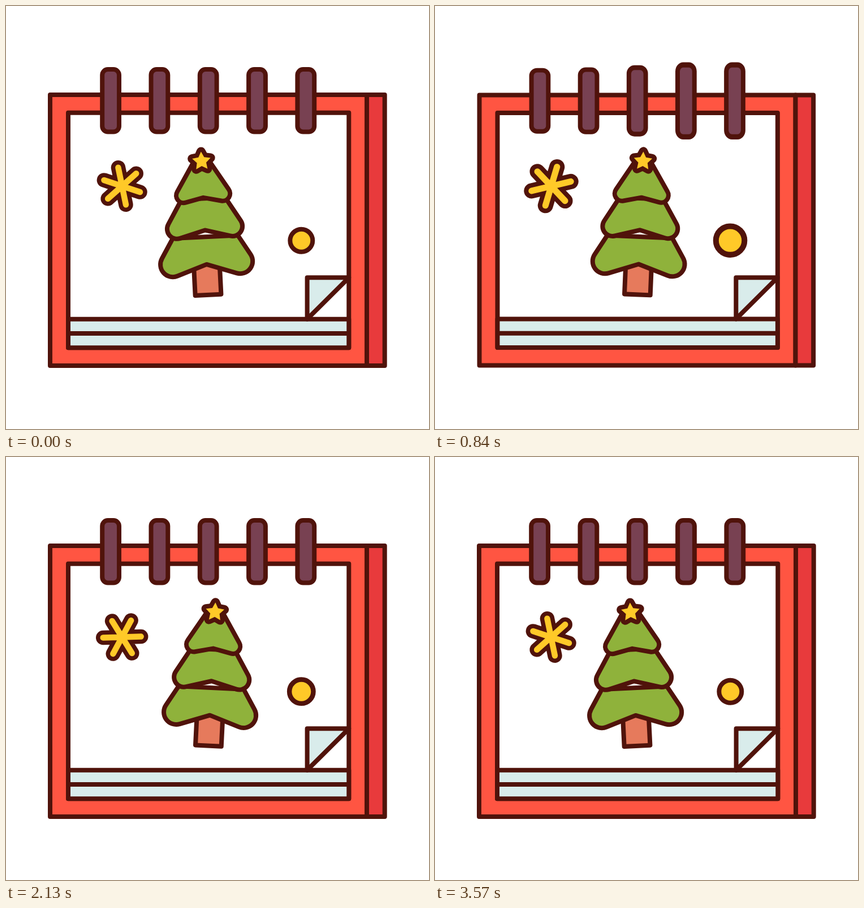
An HTML page for the animation above (3.6 s loop, 748 by 748 pixels).

```html
<!DOCTYPE html>
<html lang="en">
<head>
<meta charset="utf-8">
<title>Holiday calendar</title>
<style>
  html, body { margin: 0; width: 100%; height: 100%; overflow: hidden; background: #fff; }
  svg { display: block; width: 100vw; height: 100vh; }
  .ink { stroke: #50130b; stroke-width: 8; stroke-linejoin: round; stroke-linecap: round; }
</style>
</head>
<body>
<svg viewBox="0 0 748 748">
  <g id="calendar" class="ink" fill="none">
    <path fill="#ff5542" d="M78 157H638V636H78Z"/>
    <path fill="#e83a3c" d="M638 157H669.7V636H638Z"/>
    <path fill="#fff" d="M110 188.7H606.3V604.3H110Z"/>
    <path fill="#d9eceb" d="M110 553.7H606.3V604.3H110ZM110 579H606.3"/>
    <path fill="#d9eceb" d="M532.6 480.3H606.3L532.6 553.7Z"/>
    <g id="flake"></g>
    <circle id="dot" r="20" fill="#ffc928"/>
    <g id="tree">
      <path fill="#e67a5c" d="M334.8 455H380.6V510.7H334.8Z"/>
      <g id="tiers" fill="#8fb23b"></g>
      <path id="star" fill="#ffc928" stroke-width="16" paint-order="stroke"/>
    </g>
    <g id="rings" fill="#784152"></g>
  </g>
</svg>
<script>
const $ = id => document.getElementById(id);
const FRAME = 30, FRAMES = 120, RISE = 7, AXIS = 357.6;

// One half tier: top edge, round corner, centre notch; mirrored about the axis.
function tier(topX, topY, x1, y1, r, x2, y2, notch) {
  const m = x => 2 * AXIS - x;
  return `<path d="M${topX} ${topY}L${x1} ${y1}A${r} ${r} 0 0 0 ${x2} ${y2}L${AXIS} ${notch}` +
    `L${m(x2)} ${y2}A${r} ${r} 0 0 0 ${m(x1)} ${y1}L${m(topX)} ${topY}Z"/>`;
}

$('tiers').innerHTML =
  tier(300, 408, 279.3, 442.4, 22, 305.2, 474.8, 456.7) +
  tier(319, 340, 293.6, 382.3, 17.5, 313.2, 408.4, 396.2) +
  tier(341, 279, 312, 326, 13, 325.9, 345.7, 338.5);

const starPoints = Array.from({ length: 10 }, (_, i) => {
  const a = i * Math.PI / 5, r = i % 2 ? 8.6 : 17.1;
  return `${AXIS + r * Math.sin(a)} ${274.1 - r * Math.cos(a)}`;
});
$('star').setAttribute('d', `M${starPoints.join('L')}Z`);
$('star').style.strokeWidth = 16;

const arms = [0, 60, 120].map(a => {
  const x = 33.5 * Math.cos(a * Math.PI / 180), y = 33.5 * Math.sin(a * Math.PI / 180);
  return `M${-x} ${-y}L${x} ${y}`;
}).join('');
$('flake').innerHTML =
  `<path d="${arms}" style="stroke-width:25.5"/><path d="${arms}" style="stroke:#ffc928;stroke-width:10.5"/>`;

const rings = Array.from({ length: 5 }, () => {
  $('rings').insertAdjacentHTML('beforeend',
    '<rect x="-14.9" y="-55.2" width="29.8" height="110.4" rx="10"/>');
  return $('rings').lastElementChild;
});

// Linear rise to full size, then a damped spring around it.
function pop(f) {
  if (f <= RISE) return Math.max(0, f / RISE);
  const t = f - RISE;
  return 1 + 3 / RISE * Math.sin(Math.PI * t / 11) * Math.exp(-t / 5);
}

const swing = f => Math.cos(f * Math.PI / 10);
const set = (el, value) => el.setAttribute('transform', value);

function draw(f) {
  set($('calendar'), `translate(373.8 396.5) scale(${pop(f)}) translate(-373.8 -396.5)`);
  rings.forEach((ring, i) =>
    set(ring, `translate(${185.1 + 86.3 * i} 167.3) scale(1 ${pop(f - 7 - 3 * i)})`));
  set($('tree'),
    `translate(360 514) rotate(${-3 * swing(f)}) scale(${pop(f - 10)}) translate(-360 -514)`);
  set($('flake'), `translate(205.2 318.5) rotate(${f * 5 / 3}) scale(${pop(f - 13)})`);
  set($('dot'), `translate(522.3 414.7) scale(${pop(f - 16) * (1.042 + 0.054 * swing(f - 7))})`);
}

function tick(now) {
  const f = Math.floor(now / FRAME) % FRAMES;
  draw(f || FRAMES - 1); // the loop opens on its closing pose
  requestAnimationFrame(tick);
}
draw(FRAMES - 1);
requestAnimationFrame(() => tick(performance.now()));
</script>
</body>
</html>
```
